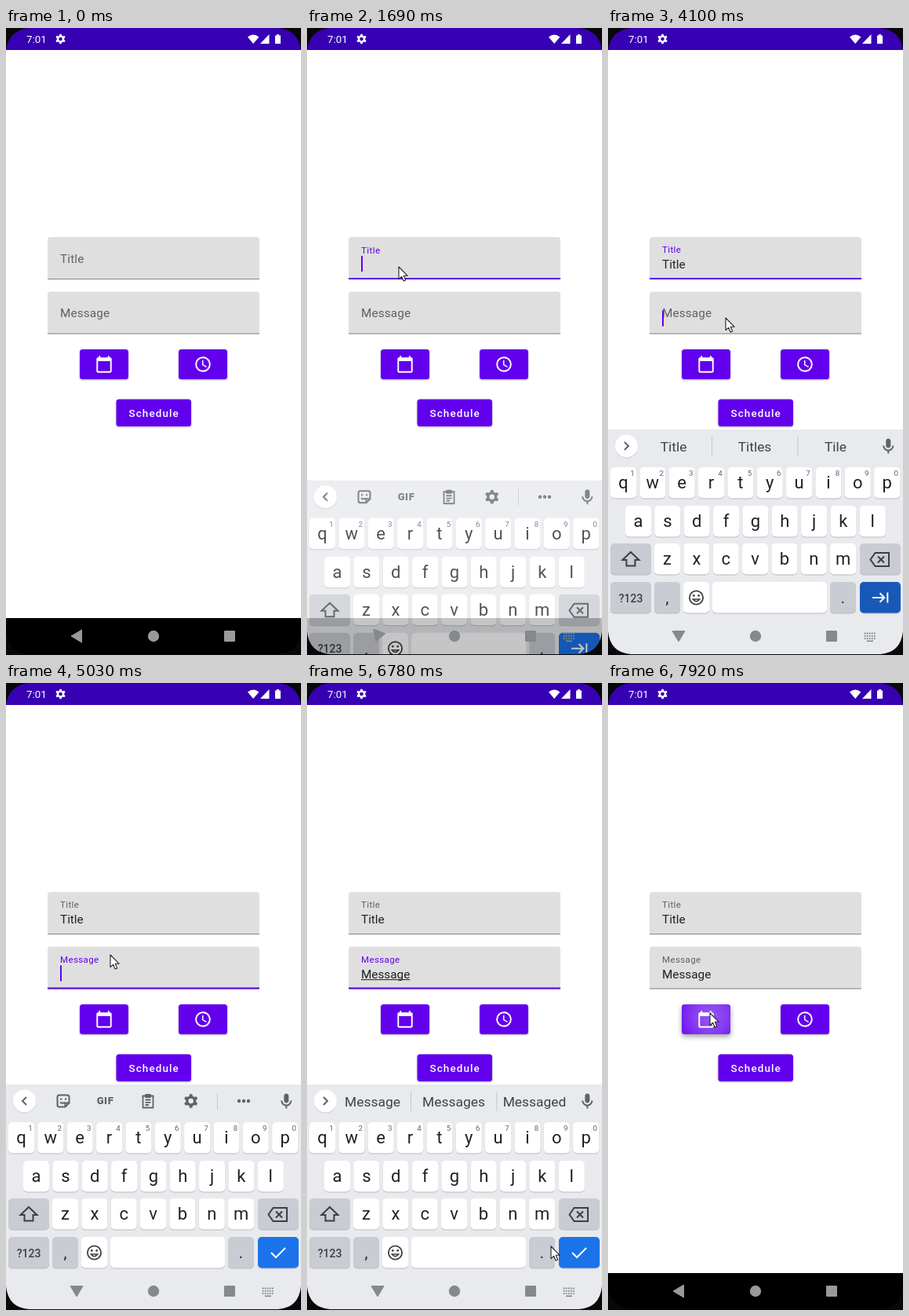
Recreate the animation shown at these times as an HTML page. Size 376 by 798 pixels, loop 7990 ms.

```html
<!DOCTYPE html>
<html lang="en">
<head>
<meta charset="utf-8">
<title>Notification form</title>
<style>
html, body { margin: 0; width: 100%; height: 100%; overflow: hidden; background: #08080a; }
svg { display: block; width: 100%; height: 100%; font-family: Roboto, "Noto Sans", sans-serif; }
</style>
</head>
<body>
<svg id="stage" viewBox="0 0 376 798"></svg>
<script>
const LOOP = 7990;
const PURPLE = '#6200ee', GREY = '#625f68', INK = '#202124', TOOL = '#5f6368';

const ICON = {
  calendar: 'M20 3h-1V1h-2v2H7V1H5v2H4c-1.1 0-2 .9-2 2v16c0 1.1.9 2 2 2h16c1.1 0 2-.9 2-2V5c0-1.1-.9-2-2-2zm0 18H4V8h16z',
  clock: 'M12 2a10 10 0 1 0 0 20a10 10 0 1 0 0-20zm0 18a8 8 0 1 1 0-16a8 8 0 1 1 0 16zm.5-13H11v6l5.25 3.15.75-1.23-4.5-2.67z',
  mic: 'M12 14c1.66 0 3-1.34 3-3V5c0-1.66-1.34-3-3-3S9 3.34 9 5v6c0 1.66 1.34 3 3 3zM17 11c0 2.76-2.24 5-5 5s-5-2.24-5-5H5c0 3.53 2.61 6.43 6 6.92V21h2v-3.08c3.39-.49 6-3.39 6-6.92z'
};

// ---- markup helpers ----
const rect = (x, y, w, h, fill, r = 0, extra = '') =>
  `<rect x="${x}" y="${y}" width="${w}" height="${h}" rx="${r}" fill="${fill}" ${extra}/>`;
const circle = (x, y, r, fill, extra = '') => `<circle cx="${x}" cy="${y}" r="${r}" fill="${fill}" ${extra}/>`;
const text = (x, y, size, fill, str, extra = '') =>
  `<text x="${x}" y="${y}" font-size="${size}" fill="${fill}" ${extra}>${str}</text>`;
const mid = 'text-anchor="middle"';
const icon = (name, x, y, s, fill) =>
  `<path d="${ICON[name]}" fill="${fill}" fill-rule="evenodd" transform="translate(${x} ${y}) scale(${s}) translate(-12 -12)"/>`;
const line = (x, y, d, stroke, w = 2, extra = '') =>
  `<path d="${d}" transform="translate(${x} ${y})" fill="none" stroke="${stroke}" stroke-width="${w}" ${extra}/>`;

function gear(x, y, r, fill) {
  let d = '';
  for (let i = 0; i < 24; i++) {
    const a = (i - .5) * Math.PI / 12 + (i % 2 ? .05 : -.05);
    const q = i % 4 < 2 ? r : r * .74;
    d += (i ? 'L' : 'M') + (x + q * Math.sin(a)).toFixed(2) + ' ' + (y - q * Math.cos(a)).toFixed(2);
  }
  const k = r * .36;
  return `<path fill="${fill}" fill-rule="evenodd" d="${d}ZM${x - k} ${y}a${k} ${k} 0 1 0 ${2 * k} 0a${k} ${k} 0 1 0 ${-2 * k} 0Z"/>`;
}

// ---- static parts ----
const statusBar = rect(0, 0, 376, 28, '#3700b3') +
  text(26, 19, 13.3, '#fff', '7:01') + gear(69.5, 14, 6.4, '#fff') +
  '<path fill="#fff" d="M308 11.4Q315.2 5.4 322.4 11.4L315.2 20ZM324 20L335.5 8V20Z"/>' +
  '<path fill="#fff" d="M343 9.4h2v-1.4h3v1.4h2V20h-7Z"/>';

const field = (id, y, hint) =>
  `<path fill="#dfdfdf" d="M53 ${y + 54}V${y + 4}q0-4 4-4H319q4 0 4 4V${y + 54}Z"/>` +
  rect(53, y + 53, 270, 1, '#858585') +
  rect(53, y + 52, 270, 2, PURPLE, 0, `id="${id}Line"`) +
  text(69, 0, 15.3, GREY, hint, `id="${id}Hint"`) +
  text(69, y + 40, 15.3, INK, '', `id="${id}Text"`) +
  rect(69, y + 41.6, 0, 1, INK, 0, `id="${id}Under"`) +
  rect(69, y + 24, 2, 20, PURPLE, 0, `id="${id}Caret"`);

const button = (x, y, w, h, extra = '') =>
  rect(x, y, w, h, PURPLE, 3.5, `style="filter:drop-shadow(0 1.5px 1.2px rgba(0,0,0,.32))" ${extra}`);

const buttons = button(94, 409, 62, 38, 'id="dateBtn"') +
  '<g clip-path="url(#dateClip)"><circle id="ripple" cx="130" cy="424" fill="url(#glow)"/></g>' +
  icon('calendar', 125, 428, .97, '#fff') +
  button(220, 409, 62, 38) + icon('clock', 251, 428, .98, '#fff') +
  button(140.5, 472.5, 95.5, 34.5) +
  text(156.5, 495, 13.4, '#fff', 'Schedule', 'font-weight="500" letter-spacing="1.12"');

const key = (x, y, w, fill = '#fff', id = '') =>
  rect(x, y + 1, w, 39.5, '#b9bcc1', 5) + rect(x, y, w, 39.5, fill, 5, id);

function keyboard() {
  const mod = '#c9ccd2';
  let s = rect(0, 511, 376, 300, '#e8eaed');
  ['qwertyuiop', 'asdfghjkl', 'zxcvbnm'].forEach((row, r) => {
    [...row].forEach((ch, i) => {
      const x = [19.5, 38.5, 75.5][r] + 37.35 * i, y = [559, 608, 656][r];
      s += key(x - 16.5, y, 33) + text(x, y + 27, 22, INK, ch, mid);
      if (!r) s += text(x + 11.5, y + 11, 9.8, TOOL, (i + 1) % 10, mid);
    });
  });
  s += key(3, 656, 52, mod) + line(29, 677, 'M0-10L10.5 0H5.5V7.5H-5.5V0H-10.5Z', '#3c4043');
  s += key(321, 656, 52, mod) +
    line(346.5, 676.5, 'M-12 0L-6-8.5H11.5V8.5H-6ZM-2.5-4l8 8m0-8l-8 8', '#3c4043');
  s += key(3, 705, 52, mod) + text(29, 730.5, 14, '#3c4043', '?123', mid + ' font-weight="500"');
  s += key(59, 705, 33, mod) + text(75.5, 732, 20, INK, ',', mid);
  s += key(96, 705, 33) + circle(112.5, 725, 8.6, 'none', 'stroke="#3c4043" stroke-width="1.8"') +
    circle(109.3, 722.3, 1.4, '#3c4043') + circle(115.7, 722.3, 1.4, '#3c4043') +
    line(112.5, 727, 'M-4.3 0Q0 5.5 4.3 0Z', '#3c4043', 1.4);
  s += key(133, 705, 146) + key(283, 705, 33, mod) + text(299.5, 732, 20, INK, '.', mid);
  s += key(321, 705, 52, '#1a73e8', 'id="enter"') +
    line(347, 725, 'M-10 0H5M-.5-5.8L5.3 0L-.5 5.8M9.3-6.5V6.5', '#fff', 2, 'id="next"') +
    line(347, 725, 'M-9 0L-3 6L9-6', '#fff', 2, 'id="done"');
  s += circle(23.5, 533, 14.5, '#c9ccd1') + circle(23.5, 532, 14.5, '#fff') +
    line(23.5, 532, 'M2.5-5L-2.5 0L2.5 5', TOOL, 2, 'id="chevron"');
  s += icon('mic', 357.3, 532.5, 1, TOOL);
  s += '<g id="tools">' +
    line(73, 532, 'M-5-7.5H5q2.5 0 2.5 2.5V2.5L2.5 7.5H-5q-2.5 0-2.5-2.5V-5q0-2.5 2.5-2.5ZM7.5 2.5H2.5V7.5M-4-2.5h2.2M2-2.5h2.2M-4 1.5Q-1 4 2 1.8', TOOL) +
    text(126.5, 536.3, 13, TOOL, 'GIF', mid + ' font-weight="900" letter-spacing=".6"') +
    line(181, 532, 'M-6.5-6.5H6.5V8.5H-6.5ZM-3.5-1.5H3.5M-3.5 1.8H3.5M-3.5 5H1', TOOL, 1.8) +
    rect(177, 523, 8, 5, TOOL, 1.5) + gear(235.7, 532, 9, TOOL) +
    rect(269, 522, 1, 21, '#c4c7cb') +
    [297, 303, 309].map(x => circle(x, 532, 2.2, TOOL)).join('') + '</g>';
  s += '<g id="words">' + rect(132, 520, 1, 25, '#c4c7cb') + rect(241.5, 520, 1, 25, '#c4c7cb') +
    [83.5, 187, 290].map((x, i) => text(x, 539, 17.4, '#3f4246', '', mid + ` id="word${i}"`)).join('') + '</g>';
  return s;
}

const navIcons = '<g id="nav">' +
  '<path id="back" d="M-7 0L6.5-8V8Z" stroke-width="1" stroke-linejoin="round"/>' +
  circle(188, 774, 7.2, 'inherit').replace('fill="inherit"', '') +
  '<rect x="278" y="767" width="14" height="14" rx="1"/></g>' +
  '<g id="kbdIcon">' + line(333.7, 770.5, 'M-7 0H7M-7 3.3H7M-7 6.6H7', '#85888c', 1.8, 'stroke-dasharray="1.8 1.25"') +
  rect(330, 779.5, 8, 1.6, '#85888c') + '</g>';

const corners = '<path fill="#08080a" d="M0 0H29Q3 3 0 29ZM376 0V29Q373 3 347 0ZM0 798V768Q3 795 29 797H347Q373 795 376 768V798Z"/>';

const stage = document.getElementById('stage');
stage.innerHTML = `<defs>
  <clipPath id="dateClip">${rect(94, 409, 62, 38, '#000', 3.5)}</clipPath>
  <radialGradient id="glow"><stop offset="0" stop-color="#fff" stop-opacity=".34"/>
  <stop offset=".45" stop-color="#fff" stop-opacity=".24"/><stop offset="1" stop-color="#fff" stop-opacity=".04"/></radialGradient>
  </defs>` + rect(0, 0, 376, 798, '#fff') + statusBar + field('title', 266, 'Title') +
  field('msg', 335.5, 'Message') + buttons + rect(0, 751, 376, 47, '#000') +
  `<g id="kbd">${keyboard()}</g>` + navIcons + corners +
  '<path id="mouse" d="M0 0V15.6L3.6 12.3L6.1 18L8.7 16.9L6.3 11.3H11.2Z" fill="#fff" stroke="#222" stroke-width="1.1" stroke-linejoin="round"/>';

const el = {};
stage.querySelectorAll('[id]').forEach(n => el[n.id] = n);
const set = (id, attrs) => { for (const k in attrs) el[id].setAttribute(k, attrs[k]); };
const show = (id, on) => el[id].setAttribute('opacity', +on);

// ---- timing helpers ----
const clamp = v => Math.max(0, Math.min(1, v));
const prog = (t, a, b) => clamp((t - a) / (b - a));
const mix = (a, b, p) => a + (b - a) * p;
const smooth = p => p * p * (3 - 2 * p);
const within = (t, a, b) => t >= a && t < b;
const latest = (list, t) => list.reduce((v, [at, val]) => t >= at ? val : v, '');

const PATH = [[780, 329, 778], [1340, 117, 304], [3000, 117, 304], [3700, 339, 724], [3840, 339, 724],
  [4100, 150, 369], [4260, 133, 346], [5950, 133, 346], [6130, 137, 330], [6710, 318, 713],
  [6780, 311, 717], [7080, 92, 768], [7160, 92, 768], [7500, 130, 420]];

const TITLE = [[2450, 'T'], [2520, 'Ti'], [2590, 'Tit'], [2660, 'Titl'], [2720, 'Title']];
const MESSAGE = [[5430, 'M'], [5540, 'Mess'], [5640, 'Messag'], [5750, 'Message']];
const WORDS = [[2450, 'T The This'], [2590, 'Tit Title It'], [2850, 'Title Titles Tile'], [4180, ''],
  [5540, 'Mess Message Messed'], [5950, 'Message Messages Messaged']];

function mouseAt(t) {
  let i = 0;
  while (i < PATH.length - 2 && t >= PATH[i + 1][0]) i++;
  const [a, x, y] = PATH[i], [b, u, v] = PATH[i + 1], p = smooth(prog(t, a, b));
  return [mix(x, u, p), mix(y, v, p)];
}

function drawField(id, y, value, float, focus, caret, under) {
  set(id + 'Hint', {
    y: mix(y + 32.5, y + 20, float), 'font-size': mix(15.3, 11.5, float),
    'letter-spacing': mix(.14, .38, float), fill: focus ? PURPLE : GREY
  });
  el[id + 'Text'].textContent = value;
  const w = value ? el[id + 'Text'].getComputedTextLength() : 0;
  show(id + 'Line', focus);
  set(id + 'Caret', { x: 69 + Math.max(0, w - .3), opacity: caret });
  set(id + 'Under', { width: under ? w : 0 });
}

function draw(t) {
  const inTitle = within(t, 1560, 4130), inMsg = within(t, 4130, 7150);
  const titleCaret = within(t, 1410, 4070) && !within(t, 1900, 2320) && !within(t, 3200, 3700);
  const fade = t < 4560 ? 1 - prog(t, 4480, 4560) : prog(t, 4900, 5000);
  const msgCaret = within(t, 4070, 6250) ? fade : 0;
  drawField('title', 266, latest(TITLE, t), 1 - (1 - prog(t, 1560, 1730)) ** 2, inTitle, +titleCaret,
    within(t, 2850, 3840));
  drawField('msg', 335.5, latest(MESSAGE, t), 1 - (1 - prog(t, 4110, 4280)) ** 2, inMsg, msgCaret,
    within(t, 5750, 7150));

  // keyboard slides and fades over the navigation bar
  const up = t < 7000 ? 1 - (1 - prog(t, 1560, 1840)) ** 2.36 : 1 - prog(t, 7140, 7360) ** 1.6;
  set('kbd', { transform: `translate(0 ${287 * (1 - up)})`, opacity: up });
  const words = latest(WORDS, t);
  show('tools', !words);
  show('words', !!words);
  words.split(' ').forEach((w, i) => el['word' + i].textContent = w);
  set('chevron', { transform: `translate(23.5 532) scale(${words ? -1 : 1} 1)` });
  show('next', t < 4200);
  show('done', t >= 4200);
  set('enter', { fill: within(t, 3840, 4180) ? '#1859b8' : '#1a73e8' });

  const tone = up > .5 ? '#85888c' : '#999';
  set('nav', { fill: tone, stroke: 'none' });
  set('back', { transform: `translate(90 774) rotate(${-90 * up})`, stroke: tone });
  show('kbdIcon', up > .7);

  // press on the date button
  const press = prog(t, 7580, 7920);
  set('ripple', { r: mix(6, 46, Math.sqrt(press)), opacity: prog(t, 7580, 7680) });
  el.dateBtn.style.filter =
    `drop-shadow(0 ${mix(1.5, 3, press)}px ${mix(1.2, 3, press)}px rgba(0,0,0,${mix(.32, .38, press)}))`;

  const [mx, my] = mouseAt(t);
  show('mouse', t >= 780);
  set('mouse', { transform: `translate(${mx} ${my})` });
}

const start = performance.now();
function tick() {
  draw((performance.now() - start) % LOOP);
  requestAnimationFrame(tick);
}
tick();
</script>
</body>
</html>
```
